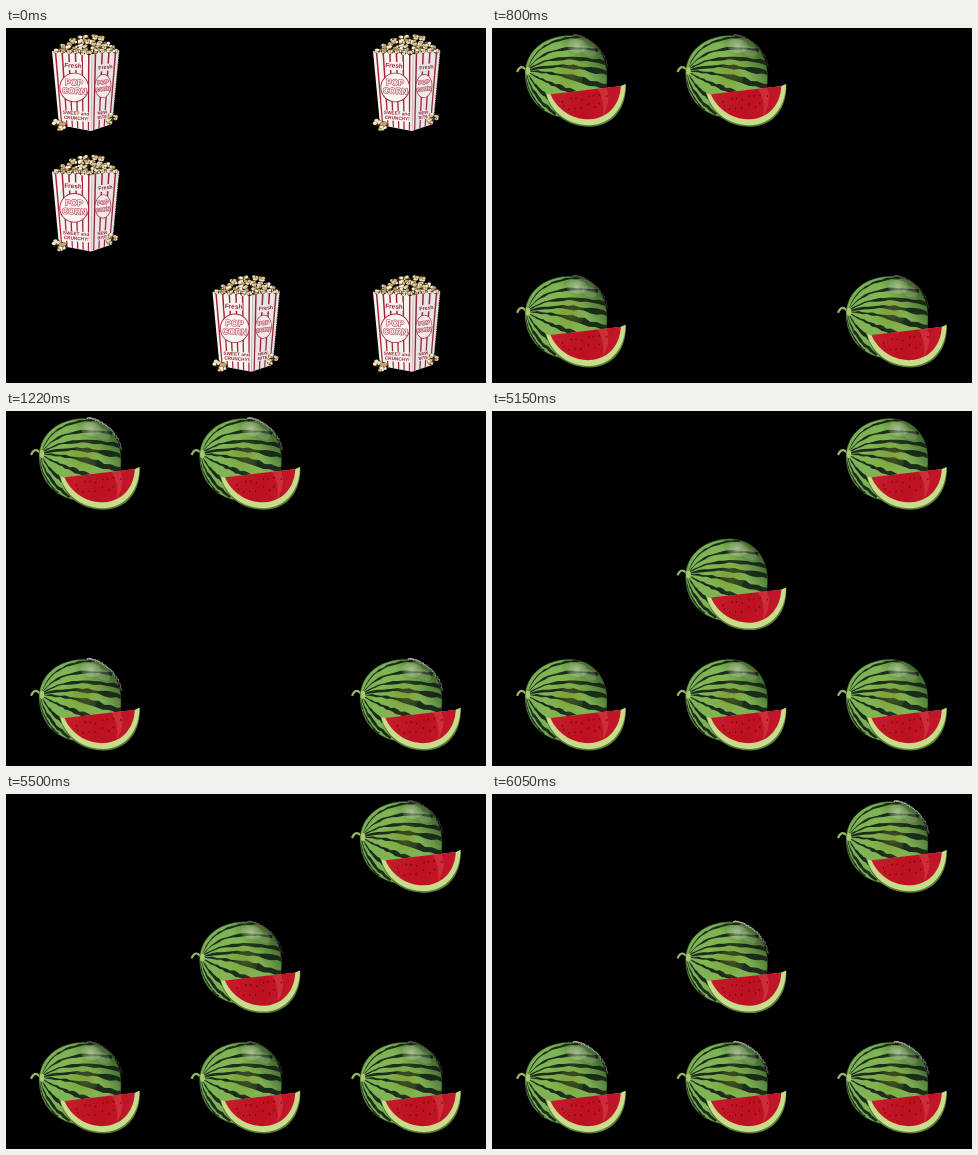
These frames come from a looping animation (480 px wide and 355 px high, 8000 ms). An HTML page with a canvas:

```html
<!DOCTYPE html>
<html lang="en">
<head>
<meta charset="utf-8">
<title>Fruit and popcorn grid</title>
<style>
  html, body { margin: 0; width: 100%; height: 100%; overflow: hidden; background: #000; }
  canvas { display: block; width: 480px; height: 355px; }
</style>
</head>
<body>
<canvas id="stage" width="480" height="355"></canvas>
<script>
const ctx = document.getElementById('stage').getContext('2d');
const LOOP = 8000, COL = 160.5, ROW = 120.4;
const TAU = Math.PI * 2;

// Each scene: start time, sprite, length of the rim fade, and [column, row] cells.
const scenes = [
  { at: 0, draw: popcorn, fade: 1, cells: [[0, 0], [2, 0], [0, 1], [1, 2], [2, 2]] },
  { at: 500, draw: melon, fade: 720, cells: [[0, 0], [1, 0], [0, 2], [2, 2]] },
  { at: 5150, draw: melon, fade: 900, cells: [[2, 0], [1, 1], [0, 2], [1, 2], [2, 2]] }
];

function random(seed) {
  return () => (seed = (seed * 16807) % 2147483647) / 2147483647;
}

function shape(d, fill, stroke, width = 1) {
  const p = new Path2D(d);
  if (fill) { ctx.fillStyle = fill; ctx.fill(p); }
  if (stroke) { ctx.strokeStyle = stroke; ctx.lineWidth = width; ctx.stroke(p); }
  return p;
}

function disc(x, y, rx, ry, fill, turn = 0) {
  ctx.fillStyle = fill;
  ctx.beginPath();
  ctx.ellipse(x, y, rx, ry, turn, 0, TAU);
  ctx.fill();
}

function radial(x, y, r0, r1, ...stops) {
  const g = ctx.createRadialGradient(x, y, r0, x, y, r1);
  stops.forEach((c, i) => g.addColorStop(i / (stops.length - 1), c));
  return g;
}

// A ragged band along a quadratic curve, thin at its start.
function stripe(x0, y0, cx, cy, x1, y1, w, seed) {
  const rnd = random(seed), n = 15, up = [], down = [];
  for (let i = 0; i <= n; i++) {
    const t = i / n, u = 1 - t;
    const x = u * u * x0 + 2 * u * t * cx + t * t * x1;
    const y = u * u * y0 + 2 * u * t * cy + t * t * y1;
    const dx = u * (cx - x0) + t * (x1 - cx), dy = u * (cy - y0) + t * (y1 - cy);
    const len = Math.hypot(dx, dy) || 1;
    const base = w * (0.2 + 0.8 * Math.min(1, t * 1.4));
    const a = base * (0.4 + rnd() * 1.1), b = base * (0.4 + rnd() * 1.1);
    up.push([x - dy / len * a, y + dx / len * a]);
    down.unshift([x + dy / len * b, y - dx / len * b]);
  }
  ctx.beginPath();
  up.concat(down).forEach(p => ctx.lineTo(...p));
  ctx.fill();
}

function melon(glow) {
  shape('M25 44Q28 37 32 40L37 44', null, '#98b765', 2.2);

  const body = 'M33 45C34 22 53 8 77 7.4C99 7.4 115 24 115 48C116 73 100 90 77 90C51 89 33 71 33 45Z';
  ctx.save();
  ctx.clip(shape(body, radial(72, 44, 4, 47, '#7dab42', '#82b552', '#7db255', '#6fa44a')));
  ctx.fillStyle = '#1b2c1c';
  stripe(36, 40, 46, 10, 90, 9, 1.2, 11);
  stripe(36, 41, 55, 14, 106, 22, 1.5, 23);
  stripe(37, 41, 62, 23, 114, 35, 1.9, 37);
  stripe(37, 42, 70, 33, 117, 46, 2.5, 41);
  stripe(37, 43, 67, 44, 117, 60, 2.7, 59);
  stripe(37, 45, 56, 55, 84, 65, 2, 61);
  stripe(36, 46, 46, 65, 66, 75, 1.6, 73);
  stripe(35, 47, 40, 69, 64, 86, 1.6, 83);
  stripe(34, 46, 34, 65, 52, 82, 0.9, 97);
  const shade = ctx.createLinearGradient(80, 46, 112, 20);
  shade.addColorStop(0.2, 'rgba(20,40,12,0)');
  shade.addColorStop(1, 'rgba(14,28,12,.6)');
  ctx.fillStyle = shade;
  ctx.fillRect(30, 0, 90, 95);
  disc(80, 45, 12, 20, radial(80, 45, 0, 20, 'rgba(128,148,50,.4)', 'rgba(128,148,50,0)'), 0.2);
  disc(85, 18, 11, 7, radial(85, 18, 1, 11, 'rgba(215,225,200,.55)', 'rgba(200,215,180,.1)'), 0.15);
  disc(97, 23, 8, 5, 'rgba(190,205,175,.2)', 0.5);
  ctx.restore();
  shape(body, null, 'rgba(28,48,20,.6)', 0.8);
  disc(36, 43, 2.3, 4, '#a7c86d');

  rim(glow);
  slice();
}

// Speckled light along the upper right edge.
function rim(glow) {
  const rnd = random(7);
  for (let i = 0; i < 64; i++) {
    const t = i / 63, a = -1.42 + t * 1.2;
    const r = 41.2 + rnd() * 1.2;
    const light = glow * (1 - 0.7 * t) * (0.6 + 0.4 * rnd());
    ctx.fillStyle = `rgba(235,235,230,${light})`;
    ctx.fillRect(74.5 + Math.cos(a) * r, 47.4 + Math.sin(a) * r, 1.2, 1.2);
  }
}

function slice() {
  shape('M54 66L58.5 66.5L128.5 58.3L133.8 56C135 80 121 98.5 98 98.7C75 99 58 85 54 66Z', '#557d34');
  shape('M54.3 65.5L58.5 66.5L128.5 58.3L133.5 56C133.5 78 120 97 97 97.2C76 97.2 59 84 54.3 65.5Z', '#c8dc8c');
  const flesh = ctx.createLinearGradient(60, 62, 125, 82);
  flesh.addColorStop(0, '#c51e2b');
  flesh.addColorStop(0.5, '#bd1020');
  flesh.addColorStop(1, '#c0192a');
  ctx.save();
  ctx.clip(shape('M58.5 66.2L128.8 58C128 76 117 90 98 91.3C79 92 64 80 58.5 66.2Z', flesh));
  shape('M105 60L114 59Q120 72 111 88Q113 71 105 60Z', 'rgba(236,104,99,.3)');
  ctx.fillStyle = '#650911';
  const rnd = random(29);
  for (let i = 0; i < 15; i++) {
    const x = 70 + (i % 8) * 6.1 + rnd() * 3;
    const y = 69 + Math.floor(i / 8) * 7 - (x - 70) * 0.08 + rnd() * 5;
    ctx.fillRect(x, y, 1, 1.7);
  }
  ctx.restore();
}

function kernel(x, y, r, rnd) {
  disc(x, y, r * 1.05, r * 0.95, '#2c2115');
  for (let i = 0; i < 4; i++) {
    const a = i * TAU / 4 + rnd() * 1.4;
    const tone = ['#efe3c4', '#dcc590', '#fbf3df', '#c6a469'][Math.floor(rnd() * 4)];
    disc(x + Math.cos(a) * r * 0.55, y + Math.sin(a) * r * 0.5, r * 0.5, r * 0.44, tone);
  }
  disc(x + r * 0.15, y + r * 0.2, r * 0.18, r * 0.16, '#7c5a2b');
}

function label(text, x, y, size, turn, fill = '#a02334', edge) {
  ctx.save();
  ctx.translate(x, y);
  ctx.rotate(turn);
  ctx.font = `bold ${size}px Arial, "Liberation Sans", sans-serif`;
  if (edge) {
    ctx.lineWidth = 1.2;
    ctx.strokeStyle = edge;
    ctx.strokeText(text, 0, 0);
  }
  ctx.fillStyle = fill;
  ctx.fillText(text, 0, 0);
  ctx.restore();
}

// Tapered vertical stripes between a top and a bottom edge.
function panel(d, paper, ink, top, bottom, count) {
  ctx.save();
  ctx.clip(shape(d, paper));
  ctx.fillStyle = ink;
  const mix = (e, t) => [e[0] + (e[2] - e[0]) * t, e[1] + (e[3] - e[1]) * t];
  for (let i = 0; i < count; i++) {
    const a = (i + 0.4) / count, b = (i + 0.63) / count;
    ctx.beginPath();
    [mix(top, a), mix(top, b), mix(bottom, b), mix(bottom, a)].forEach(p => ctx.lineTo(...p));
    ctx.fill();
  }
  ctx.restore();
}

function popcorn() {
  const rnd = random(113), paper = '#f7f4f2', side = '#e9e4e3';
  for (let row = 0; row < 4; row++) {
    const n = 5 + row * 2, half = 13 + row * 5.4;
    for (let i = 0; i < n; i++) {
      const u = i / (n - 1) * 2 - 1;
      kernel(81 + u * half + rnd() * 3 - 1.5, 9.5 + row * 4.4 + u * u * 2 + rnd() * 3 - 1.5, 3.3, rnd);
    }
  }

  panel('M46 23L86 26L85 103L53 97Z', paper, '#a32635', [46, 23, 86, 26], [53, 97, 85, 103], 6);
  panel('M86 26L113 22L106 96L85 103Z', side, '#942838', [86, 26, 113, 22], [85, 103, 106, 96], 4);
  shape('M86 26L85 102', null, '#c9bfbd', 0.8);
  for (let i = 0; i < 10; i++) kernel(50 + i * 6.6, 23.5 - Math.abs(i - 4.5) * 0.5 + rnd() * 2, 2.6, rnd);

  ctx.textAlign = 'center';
  ctx.textBaseline = 'middle';
  shape('M58 34L76 34L76 42L58 42Z', paper);
  label('Fresh', 67, 38, 6.4, 0.06);
  shape('M91 37L107 35L107 42L91 44Z', side);
  label('Fresh', 99.5, 39.5, 5.2, -0.1, '#8d2438');

  disc(68.2, 59.5, 14.8, 14.8, '#a92c3c');
  disc(68.2, 59.5, 13.9, 13.9, '#fbf7f6');
  label('POP', 68, 55, 8.5, 0.04, '#fbeef0', '#c05563');
  label('CORN', 68.4, 63.5, 8.3, 0.04, '#fbeef0', '#c05563');
  disc(97, 58, 8.4, 12, '#a03544', 0.05);
  disc(97, 58, 7.7, 11.3, '#efeae9', 0.05);
  label('POP', 97, 54.5, 5.4, -0.12, '#eedddd', '#b5596a');
  label('CORN', 97, 61.5, 4.9, -0.12, '#eedddd', '#b5596a');

  shape('M57 82L83 84L83 94L57 92Z', paper);
  label('SWEET and', 70, 85.5, 4.7, 0.07);
  label('CRUNCHY!', 70.2, 90.3, 4.7, 0.07);
  shape('M89 84L104 81L103 90L89 93Z', side);
  label('NEW', 96.5, 85, 4.2, -0.15, '#8d2438');
  label('BITE', 96.3, 89.3, 4.2, -0.15, '#8d2438');

  kernel(50, 94.5, 4, rnd);
  kernel(56.5, 97.5, 4.2, rnd);
  kernel(54, 100.5, 3, rnd);
  kernel(105, 87.5, 3, rnd);
  kernel(109, 89.5, 3, rnd);
  kernel(103.5, 93, 3, rnd);

  ctx.setLineDash([1, 1.4]);
  shape('M113 23L107 86', null, '#d9d9d9', 0.9);
  ctx.setLineDash([]);
}

function render(t) {
  ctx.fillStyle = '#000';
  ctx.fillRect(0, 0, 480, 355);
  const scene = scenes.filter(s => s.at <= t).pop();
  const glow = Math.min(1, (t - scene.at) / scene.fade);
  for (const [col, row] of scene.cells) {
    ctx.save();
    ctx.translate(col * COL, row * ROW);
    scene.draw(glow);
    ctx.restore();
  }
}

const start = performance.now();
function tick() {
  render((performance.now() - start) % LOOP);
  requestAnimationFrame(tick);
}
tick();
</script>
</body>
</html>
```
